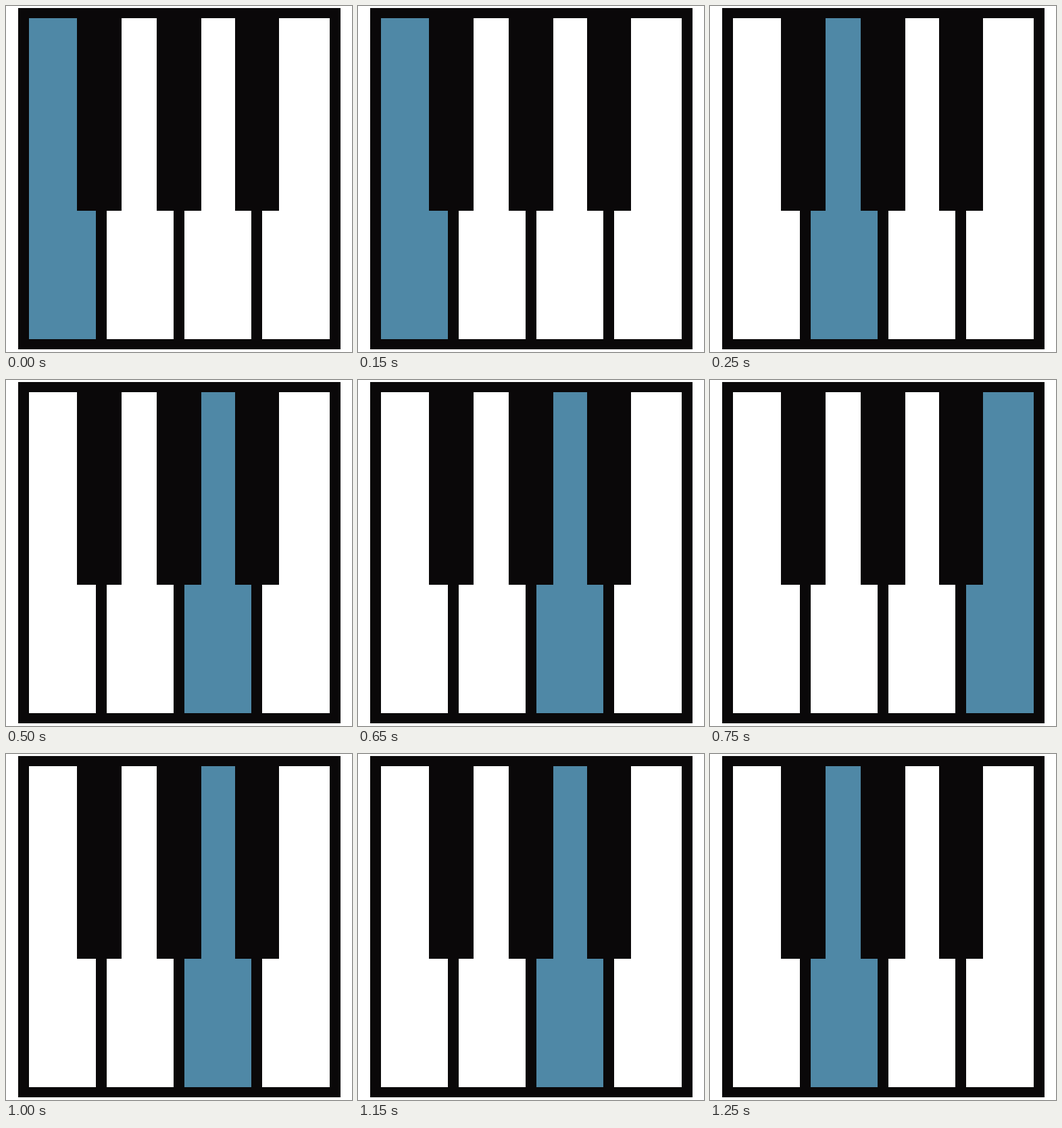
An HTML page for the animation above (1500 ms loop, 512 px wide and 512 px high).

```html
<!DOCTYPE html>
<html lang="en">
<head>
<meta charset="utf-8">
<title>Piano keys</title>
<style>
  html, body { margin: 0; width: 100%; height: 100%; overflow: hidden; background: #fff; }
  svg { display: block; width: 100%; height: 100%; }
</style>
</head>
<body>
<svg viewBox="0 0 512 512" shape-rendering="crispEdges">
  <path fill="#0a0809" d="M18 3H495V508H18Z"/>
  <g id="keys" fill="#fff">
    <path d="M34 18H105V303H133V493H34Z"/>
    <path d="M171 18H223V303H248V493H149V303H171Z"/>
    <path d="M289 18H339V303H363V493H264V303H289Z"/>
    <path d="M404 18H479V493H379V303H404Z"/>
  </g>
</svg>
<script>
  const STEP = 250;
  const melody = [0, 1, 2, 3, 2, 1];
  const keys = [...document.getElementById('keys').children];
  const start = performance.now();

  function draw() {
    const beat = Math.floor((performance.now() - start) / STEP) % melody.length;
    keys.forEach((key, i) => key.setAttribute('fill', i === melody[beat] ? '#4f88a6' : '#fff'));
    requestAnimationFrame(draw);
  }
  draw();
</script>
</body>
</html>
```
